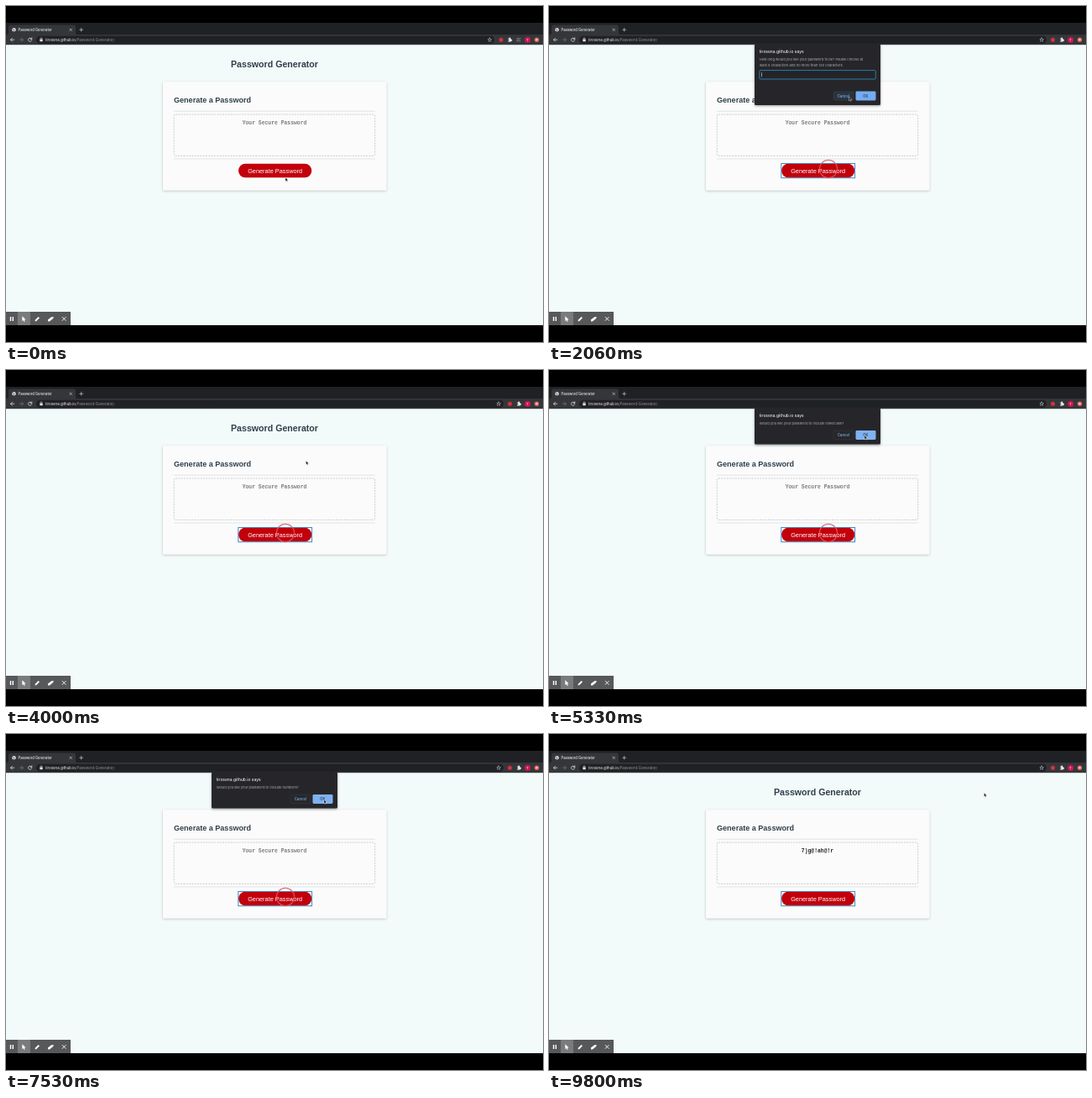
Animation, 640 px wide and 400 px high, one loop 9860 ms. Source, as an HTML page:

```html
<!DOCTYPE html>
<html lang="en">
<head>
<meta charset="utf-8">
<title>Password Generator</title>
<style>
html, body { margin: 0; width: 100%; height: 100%; overflow: hidden; background: #000; }
svg { display: block; width: 640px; height: 400px; }
text { font-family: "Liberation Sans", Arial, sans-serif; white-space: pre; }
.ui text { font-family: Inter, Roboto, sans-serif; }
.mono { font-family: "Liberation Mono", "Courier New", monospace; font-weight: bold; font-size: 6.4px; text-anchor: middle; }
.mid { text-anchor: middle; }
.line { fill: none; stroke-linecap: round; stroke-linejoin: round; }
</style>
</head>
<body>
<svg viewBox="0 0 640 400" xmlns="http://www.w3.org/2000/svg">
  <defs>
    <filter id="soft" x="-10%" y="-10%" width="120%" height="130%">
      <feDropShadow dx="0" dy="1" stdDeviation="1.6" flood-color="#000" flood-opacity=".24"/>
    </filter>
    <filter id="deep" x="-10%" y="-10%" width="120%" height="130%">
      <feDropShadow dx="0" dy="1" stdDeviation="1.8" flood-color="#000" flood-opacity=".4"/>
    </filter>
  </defs>
  <rect width="640" height="400"/>

  <!-- page -->
  <rect y="46" width="640" height="334" fill="#f3fafa"/>
  <text class="mid" x="320" y="73.2" font-size="10.63" font-weight="bold" fill="#2f3f4b">Password Generator</text>
  <rect x="187" y="90.3" width="266.3" height="129" rx="1" fill="#fbfbfb" filter="url(#soft)"/>
  <text x="200" y="115.3" font-size="9.05" font-weight="bold" fill="#2f3f4b">Generate a Password</text>
  <path d="M200 125.2H440M200 182H440" stroke="#d6d8d9" stroke-width=".7"/>
  <rect x="200.3" y="129" width="239.4" height="49.4" rx="1.6" fill="none" stroke="#bfc1c3" stroke-width=".8" stroke-dasharray="2 1.3"/>
  <text id="field" class="mono" x="320" y="140.6"></text>
  <rect x="277" y="187.8" width="87.3" height="16.5" rx="8.25" fill="#c2000c"/>
  <text class="mid" x="320.6" y="198.5" font-size="7.35" fill="#fff">Generate Password</text>
  <rect id="focus" x="276.8" y="187.5" width="87.8" height="17.2" fill="none" stroke="#3f87c4" stroke-width="1"/>
  <circle id="ring" cx="333" cy="194" r="10.6" fill="none" stroke="#dd5a60" stroke-width="1.1" opacity=".85"/>

  <!-- browser frame -->
  <g class="ui">
    <rect y="20" width="640" height="14.6" fill="#202124"/>
    <rect y="34" width="640" height="12.2" fill="#35363a"/>
    <path d="M1 34.2Q3 34 3 31.500V25Q3 22.500 5.500 22.500H80.500Q83 22.500 83 25V31.500Q83 34 85 34.200Z" fill="#35363a"/>
    <circle cx="9.500" cy="28.300" r="2.300" fill="#d5d7da"/>
    <path class="line" d="M8.100 27.400L9.800 28.400L9.300 29.900" stroke="#55585c" stroke-width=".7"/>
    <text x="14.500" y="29.900" font-size="4.150" font-weight="500" fill="#e8eaed">Password Generator</text>
    <path class="line" d="M75.900 27l2.600 2.600m0-2.600l-2.600 2.600M87.700 28.300h4m-2-2v4" stroke="#d0d2d5" stroke-width=".65"/>
    <path class="line" d="M9.800 40.200H5.500m2-2l-2 2l2 2" stroke="#e3e5e8" stroke-width=".75"/>
    <path class="line" d="M16.300 40.200H20.500m-2-2l2 2l-2 2" stroke="#77797d" stroke-width=".75"/>
    <path class="line" d="M30.400 39A2.100 2.100 0 1 0 30.700 40.700M30.800 37.800V39.400H29.200" stroke="#e3e5e8" stroke-width=".75"/>
    <rect id="omni" x="36" y="35.700" width="546" height="9" rx="4.500" fill="#202124"/>
    <rect x="40.300" y="39.500" width="3.400" height="2.700" rx=".3" fill="#dfe1e4"/>
    <path class="line" d="M41 39.500v-.7a1 1 0 0 1 2 0v.7" stroke="#dfe1e4" stroke-width=".6"/>
    <text x="47" y="41.700" font-size="4.400" fill="#f1f3f4">tirosena.github.io<tspan fill="#94989d">/Password-Generator/</tspan></text>
    <path id="star" class="line" d="M0-2.300L.7-.7L2.300-.6L1.100.5L1.500 2.100L0 1.200L-1.500 2.100L-1.100.5L-2.300-.6L-.7-.7Z" stroke="#c9ccd0" stroke-width=".55"/>
    <circle id="ext" cy="40.200" r="2.500" fill="#d3323f"/>
    <path id="puzzle" d="M-2.200-1.300H-.9A.9.900 0 1 1 .7-1.300H1.500V0A.9.900 0 1 1 1.500 1.500V2.400H-2.200V1.200A.8.800 0 1 0-2.200-.2Z" fill="#e8eaed"/>
    <path id="list" class="line" d="M608.800 38.700h4.600m-4.600 1.600h3m-3 1.600h2m1.800-1v1.400" stroke="#a3a6aa" stroke-width=".6"/>
    <circle cx="621.600" cy="40.200" r="3.500" fill="#d0164f"/>
    <text class="mid" x="621.600" y="41.600" font-size="3.800" fill="#fff">T</text>
    <circle cx="632.500" cy="40.200" r="2.700" fill="#e5675f"/>
    <circle cx="632.500" cy="40.200" r="1.100" fill="#f7d4d0"/>
  </g>

  <!-- dialog -->
  <g id="dialog" class="ui">
    <rect id="panel" x="245" y="45" width="150" rx="1.500" fill="#27282b" filter="url(#deep)"/>
    <text x="250.700" y="55.600" font-size="4.900" font-weight="500" fill="#e4e6e9">tirosena.github.io says</text>
    <g font-size="4.080" fill="#a7abb0">
      <text id="ask1" x="250.700" y="65.300"></text>
      <text id="ask2" x="250.700" y="72"></text>
    </g>
    <g id="prompt">
      <rect x="250.900" y="76.600" width="138.400" height="10.400" rx="1" fill="#232427" stroke="#3279a6" stroke-width="1"/>
      <text id="typed" x="253.200" y="83.400" font-size="4.300" fill="#e8eaed"></text>
      <rect id="caret" y="79.300" width=".6" height="5" fill="#e8eaed"/>
    </g>
    <g id="buttons">
      <rect id="cancel" x="339" y="-5.200" width="24" height="10.400" rx="1.300" stroke="#36393e" stroke-width=".6"/>
      <text class="mid" x="351" y="1.500" font-size="4.200" font-weight="500" fill="#80b2f3">Cancel</text>
      <rect id="ok" x="365.500" y="-5.400" width="24" height="10.800" rx="1.300"/>
      <text class="mid" x="377.400" y="1.500" font-size="4.200" font-weight="500" fill="#26384f">OK</text>
    </g>
  </g>

  <!-- recorder bar -->
  <rect y="364" width="77" height="16" fill="#56585a"/>
  <rect x="14" y="364" width="15" height="16" fill="#797b7d"/>
  <path d="M4.800 370h1.400v5h-1.400zM7.600 370h1.400v5h-1.400z" fill="#fff"/>
  <path d="M19.300 369.300V375.200L20.700 374L21.700 376.100L22.700 375.600L21.700 373.600H23.600Z" fill="#fff"/>
  <path d="M34.500 375.400L35 373.500L38.600 369.900L40 371.300L36.400 374.900Z" fill="#fff"/>
  <path d="M49.900 373.500L54.200 370.300L56.700 370L56.200 372L51.900 375.400H50.100Z" fill="#fff"/>
  <path class="line" d="M67.200 370.400l4 4m0-4l-4 4" stroke="#fff" stroke-width=".9"/>

  <path id="cursor" d="M0 0V4.800L1.150 3.750L1.850 5.350L2.650 5L1.950 3.450H3.400Z" fill="#111" stroke="#fff" stroke-width=".4"/>
</svg>
<script>
const LOOP = 9860;
const $ = id => document.getElementById(id);
const show = (id, on) => $(id).setAttribute("visibility", on ? "inherit" : "hidden");
const move = (id, x, y) => $(id).setAttribute("transform", `translate(${x} ${y})`);
const set = (id, name, value) => $(id).setAttribute(name, value);
const write = (id, s) => { if ($(id).textContent !== s) $(id).textContent = s; };

// time, x, y of the pointer tip
const path = [
  [0, 333, 204], [60, 333, 204], [400, 333, 194], [860, 333, 194],
  [1530, 357.5, 108], [4600, 357.5, 108], [5130, 376, 77.8], [5730, 376, 77.8],
  [6400, 349.5, 77.8], [7050, 349.5, 77.8], [7530, 379, 78],
  [8860, 379, 78], [9400, 518.5, 70], [LOOP, 518.5, 70]
];

const include = "Would you like your password to include ";
const dialogs = [
  { from: 660, to: 3860, bottom: 118, y: 107, prompt: true,
    ask: ["How long would you like your password to be? Please choose at",
          "least 8 characters and no more than 128 characters."] },
  { from: 4200, to: 5460, bottom: 88.5, y: 77.5, ask: [include + "lowercase?"] },
  { from: 5660, to: 6930, bottom: 88.5, y: 77.5, ask: [include + "uppercase?"] },
  { from: 7130, to: 7740, bottom: 88.5, y: 77.5, ask: [include + "numbers?"] },
  { from: 7930, to: 8800, bottom: 95.3, y: 84.2, ask: [include + "special characters?"] }
];

function pointer(t) {
  const i = path.findIndex(p => p[0] > t);
  const [t0, x0, y0] = path[i - 1], [t1, x1, y1] = path[i];
  const k = (t - t0) / (t1 - t0), e = k * k * (3 - 2 * k);
  return [x0 + (x1 - x0) * e, y0 + (y1 - y0) * e];
}

function drawDialog(d, t, x, y) {
  show("dialog", !!d);
  if (!d) return;
  const inside = left => x > left && x < left + 24 && Math.abs(y - d.y) < 5.5;
  set("panel", "height", d.bottom - 45);
  write("ask1", d.ask[0]);
  write("ask2", d.ask[1] || "");
  move("buttons", 0, d.y);
  set("cancel", "fill", inside(339) ? "#2b343f" : "#27282b");
  set("ok", "fill", inside(365.5) ? "#7fb2f0" : "#74acf2");
  show("prompt", d.prompt);
  if (!d.prompt) return;
  const n = (t >= 2930) + (t >= 3200);
  write("typed", "10".slice(0, n));
  set("caret", "x", 253.3 + [0, 2.1, 4.9][n]);
  show("caret", (t - d.from) % 1000 < 600);
}

function draw(t) {
  const [x, y] = pointer(t);
  const done = t >= 8800, shifted = t >= 330;
  move("cursor", x, y);
  write("field", done ? "7)g@!ah@!r" : "Your Secure Password");
  set("field", "fill", done ? "#222" : "#7b7b7b");
  show("focus", t >= 600);
  show("ring", t >= 600 && !done);
  set("omni", "width", shifted ? 557 : 546);
  move("star", shifted ? 587.2 : 576.5, 40.2);
  set("ext", "cx", shifted ? 600.5 : 590);
  move("puzzle", shifted ? 611.3 : 600.5, 40);
  show("list", !shifted);
  drawDialog(dialogs.find(d => t >= d.from && t < d.to), t, x, y);
}

let start;
function tick(now) {
  start ??= now;
  draw((now - start) % LOOP);
  requestAnimationFrame(tick);
}
draw(0);
requestAnimationFrame(tick);
</script>
</body>
</html>
```
